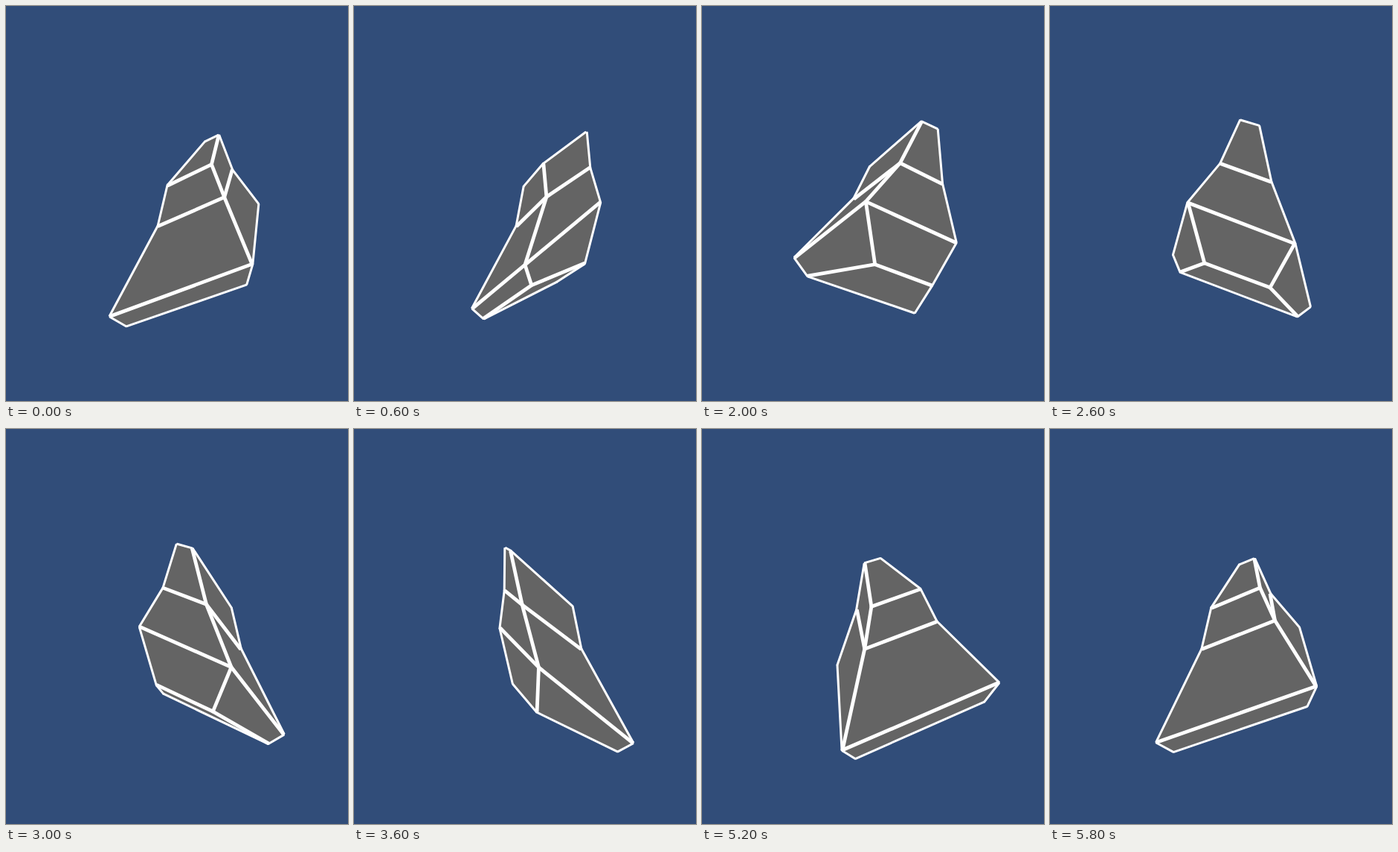
Write an HTML page without scripts that moves like this. It is 460x530 px and loops after 6000 ms.

```html
<!DOCTYPE html>
<html lang="en">
<head>
<meta charset="utf-8">
<title>Turning solid</title>
<style>
@property --t { syntax: "<angle>"; inherits: true; initial-value: 0deg; }
@property --c { syntax: "<number>"; inherits: true; initial-value: 1; }
@property --s { syntax: "<number>"; inherits: true; initial-value: 0; }

html, body { margin: 0; width: 100%; height: 100%; overflow: hidden; background: #314d79; }

@keyframes spin { to { --t: 360deg; } }

/* Each vertex: q = perspective factor, then screen x and y */
.solid {
  position: absolute; left: 0; top: 0; width: 460px; height: 530px; overflow: hidden;
  animation: spin 6s steps(30) infinite;
  --c: cos(var(--t)); --s: sin(var(--t));

  /* tip edge */
  --Aq: calc(760 / (760 + 66.6 * var(--c) - 8.7 * var(--s)));
  --Ax: calc(260 + (8.7 * var(--c) + 66.6 * var(--s)) * var(--Aq));
  --Ay: calc(296 - 123.7 * var(--Aq));
  --Bq: calc(760 / (760 + 54 * var(--c) - 27.9 * var(--s)));
  --Bx: calc(260 + (27.9 * var(--c) + 54 * var(--s)) * var(--Bq));
  --By: calc(296 - 131.2 * var(--Bq));

  /* shoulder */
  --Cq: calc(760 / (760 + 3.5 * var(--c) + 42.3 * var(--s)));
  --Cx: calc(260 + (-42.3 * var(--c) + 3.5 * var(--s)) * var(--Cq));
  --Cy: calc(296 - 55.9 * var(--Cq));
  --Dq: calc(760 / (760 - 30 * var(--c) - 15.8 * var(--s)));
  --Dx: calc(260 + (15.8 * var(--c) - 30 * var(--s)) * var(--Dq));
  --Dy: calc(296 - 80.5 * var(--Dq));

  /* waist */
  --Eq: calc(760 / (760 + 3 * var(--c) + 55.2 * var(--s)));
  --Ex: calc(260 + (-55.2 * var(--c) + 3 * var(--s)) * var(--Eq));
  --Ey: calc(296 - 1.2 * var(--Eq));
  --Fq: calc(760 / (760 - 45.3 * var(--c) - 31.7 * var(--s)));
  --Fx: calc(260 + (31.7 * var(--c) - 45.3 * var(--s)) * var(--Fq));
  --Fy: calc(296 - 37.4 * var(--Fq));
  --Gq: calc(760 / (760 + 65 * var(--c) + 8.6 * var(--s)));
  --Gx: calc(260 + (-8.6 * var(--c) + 65 * var(--s)) * var(--Gq));
  --Gy: calc(296 - 56 * var(--Gq));
  --Hq: calc(760 / (760 + 33.5 * var(--c) - 46 * var(--s)));
  --Hx: calc(260 + (46 * var(--c) + 33.5 * var(--s)) * var(--Hq));
  --Hy: calc(296 - 79.3 * var(--Hq));

  /* rim */
  --Iq: calc(760 / (760 - 22 * var(--c) + 116.5 * var(--s)));
  --Ix: calc(260 + (-116.5 * var(--c) - 22 * var(--s)) * var(--Iq));
  --Iy: calc(296 + 116.5 * var(--Iq));
  --Jq: calc(760 / (760 - 123.8 * var(--c) - 59.4 * var(--s)));
  --Jx: calc(260 + (59.4 * var(--c) - 123.8 * var(--s)) * var(--Jq));
  --Jy: calc(296 + 41.8 * var(--Jq));
  --Kq: calc(760 / (760 + 71.2 * var(--c) + 39 * var(--s)));
  --Kx: calc(260 + (-39 * var(--c) + 71.2 * var(--s)) * var(--Kq));
  --Ky: calc(296 + 21 * var(--Kq));
  --Lq: calc(760 / (760 + 4.3 * var(--c) - 79.4 * var(--s)));
  --Lx: calc(260 + (79.4 * var(--c) + 4.3 * var(--s)) * var(--Lq));
  --Ly: calc(296 - 30.8 * var(--Lq));

  /* underside */
  --Mq: calc(760 / (760 - 21.6 * var(--c) + 95.3 * var(--s)));
  --Mx: calc(260 + (-95.3 * var(--c) - 21.6 * var(--s)) * var(--Mq));
  --My: calc(296 + 128.8 * var(--Mq));
  --Nq: calc(760 / (760 - 105.3 * var(--c) - 54.3 * var(--s)));
  --Nx: calc(260 + (54.3 * var(--c) - 105.3 * var(--s)) * var(--Nq));
  --Ny: calc(296 + 66.2 * var(--Nq));
  --Oq: calc(760 / (760 + 45.8 * var(--c) + 17.2 * var(--s)));
  --Ox: calc(260 + (-17.2 * var(--c) + 45.8 * var(--s)) * var(--Oq));
  --Oy: calc(296 + 77.7 * var(--Oq));
  --Pq: calc(760 / (760 + 3.2 * var(--c) - 56.6 * var(--s)));
  --Px: calc(260 + (56.6 * var(--c) + 3.2 * var(--s)) * var(--Pq));
  --Py: calc(296 + 47 * var(--Pq));
}

/* Faces wind clockwise; the cross product of the diagonals hides back and edge-on faces */
.face, .face b { position: absolute; inset: 0; }
.face {
  opacity: calc((var(--x2) - var(--x0)) * (var(--y3) - var(--y1))
              - (var(--y2) - var(--y0)) * (var(--x3) - var(--x1)) - 300);
}
.face b {
  background: #646464;
  clip-path: polygon(
    calc(var(--x0) * 1px) calc(var(--y0) * 1px), calc(var(--x1) * 1px) calc(var(--y1) * 1px),
    calc(var(--x2) * 1px) calc(var(--y2) * 1px), calc(var(--x3) * 1px) calc(var(--y3) * 1px));
}
/* Edges sit mostly outside their face, so shared edges come out thicker than the outline */
.face i {
  position: absolute; z-index: 1; left: 0; top: -2.4px; height: 3.4px; border-radius: 1px;
  background: #fff; transform-origin: 0 2.4px;
  width: calc(hypot(var(--u) - var(--x), var(--v) - var(--y)) * 1px + 2px);
  transform: translate(calc(var(--x) * 1px), calc(var(--y) * 1px))
    rotate(atan2(var(--v) - var(--y), var(--u) - var(--x))) translateX(-1px);
}
i:nth-of-type(1) { --x: var(--x0); --y: var(--y0); --u: var(--x1); --v: var(--y1); }
i:nth-of-type(2) { --x: var(--x1); --y: var(--y1); --u: var(--x2); --v: var(--y2); }
i:nth-of-type(3) { --x: var(--x2); --y: var(--y2); --u: var(--x3); --v: var(--y3); }
i:nth-of-type(4) { --x: var(--x3); --y: var(--y3); --u: var(--x0); --v: var(--y0); }

/* Corner sets shared by faces */
.a0 { --x0: var(--Ax); --y0: var(--Ay); } .b0 { --x0: var(--Bx); --y0: var(--By); }
.c0 { --x0: var(--Cx); --y0: var(--Cy); } .d0 { --x0: var(--Dx); --y0: var(--Dy); }
.e0 { --x0: var(--Ex); --y0: var(--Ey); } .f0 { --x0: var(--Fx); --y0: var(--Fy); }
.g0 { --x0: var(--Gx); --y0: var(--Gy); } .h0 { --x0: var(--Hx); --y0: var(--Hy); }
.i0 { --x0: var(--Ix); --y0: var(--Iy); } .j0 { --x0: var(--Jx); --y0: var(--Jy); }
.k0 { --x0: var(--Kx); --y0: var(--Ky); } .l0 { --x0: var(--Lx); --y0: var(--Ly); }
.n0 { --x0: var(--Nx); --y0: var(--Ny); }
.a1 { --x1: var(--Ax); --y1: var(--Ay); } .b1 { --x1: var(--Bx); --y1: var(--By); }
.c1 { --x1: var(--Cx); --y1: var(--Cy); } .d1 { --x1: var(--Dx); --y1: var(--Dy); }
.e1 { --x1: var(--Ex); --y1: var(--Ey); } .f1 { --x1: var(--Fx); --y1: var(--Fy); }
.g1 { --x1: var(--Gx); --y1: var(--Gy); } .h1 { --x1: var(--Hx); --y1: var(--Hy); }
.i1 { --x1: var(--Ix); --y1: var(--Iy); } .j1 { --x1: var(--Jx); --y1: var(--Jy); }
.k1 { --x1: var(--Kx); --y1: var(--Ky); } .l1 { --x1: var(--Lx); --y1: var(--Ly); }
.p1 { --x1: var(--Px); --y1: var(--Py); }
.d2 { --x2: var(--Dx); --y2: var(--Dy); } .e2 { --x2: var(--Ex); --y2: var(--Ey); }
.f2 { --x2: var(--Fx); --y2: var(--Fy); } .g2 { --x2: var(--Gx); --y2: var(--Gy); }
.h2 { --x2: var(--Hx); --y2: var(--Hy); } .i2 { --x2: var(--Ix); --y2: var(--Iy); }
.j2 { --x2: var(--Jx); --y2: var(--Jy); } .k2 { --x2: var(--Kx); --y2: var(--Ky); }
.l2 { --x2: var(--Lx); --y2: var(--Ly); } .m2 { --x2: var(--Mx); --y2: var(--My); }
.n2 { --x2: var(--Nx); --y2: var(--Ny); } .o2 { --x2: var(--Ox); --y2: var(--Oy); }
.p2 { --x2: var(--Px); --y2: var(--Py); }
.c3 { --x3: var(--Cx); --y3: var(--Cy); } .e3 { --x3: var(--Ex); --y3: var(--Ey); }
.f3 { --x3: var(--Fx); --y3: var(--Fy); } .g3 { --x3: var(--Gx); --y3: var(--Gy); }
.h3 { --x3: var(--Hx); --y3: var(--Hy); } .i3 { --x3: var(--Ix); --y3: var(--Iy); }
.j3 { --x3: var(--Jx); --y3: var(--Jy); } .k3 { --x3: var(--Kx); --y3: var(--Ky); }
.l3 { --x3: var(--Lx); --y3: var(--Ly); } .m3 { --x3: var(--Mx); --y3: var(--My); }
.n3 { --x3: var(--Nx); --y3: var(--Ny); } .o3 { --x3: var(--Ox); --y3: var(--Oy); }
.p3 { --x3: var(--Px); --y3: var(--Py); }
</style>
</head>
<body>
<div class="solid">
  <div class="face n0 p1 o2 m3"><b></b><i></i><i></i><i></i><i></i></div>
  <div class="face i0 j1 n2 m3"><b></b><i></i><i></i><i></i><i></i></div>
  <div class="face j0 l1 p2 n3"><b></b><i></i><i></i><i></i><i></i></div>
  <div class="face l0 k1 o2 p3"><b></b><i></i><i></i><i></i><i></i></div>
  <div class="face k0 i1 m2 o3"><b></b><i></i><i></i><i></i><i></i></div>
  <div class="face e0 f1 j2 i3"><b></b><i></i><i></i><i></i><i></i></div>
  <div class="face f0 h1 l2 j3"><b></b><i></i><i></i><i></i><i></i></div>
  <div class="face h0 g1 k2 l3"><b></b><i></i><i></i><i></i><i></i></div>
  <div class="face g0 e1 i2 k3"><b></b><i></i><i></i><i></i><i></i></div>
  <div class="face c0 d1 f2 e3"><b></b><i></i><i></i><i></i><i></i></div>
  <div class="face d0 b1 h2 f3"><b></b><i></i><i></i><i></i><i></i></div>
  <div class="face b0 a1 g2 h3"><b></b><i></i><i></i><i></i><i></i></div>
  <div class="face a0 c1 e2 g3"><b></b><i></i><i></i><i></i><i></i></div>
  <div class="face a0 b1 d2 c3"><b></b><i></i><i></i><i></i><i></i></div>
</div>
</body>
</html>
```
